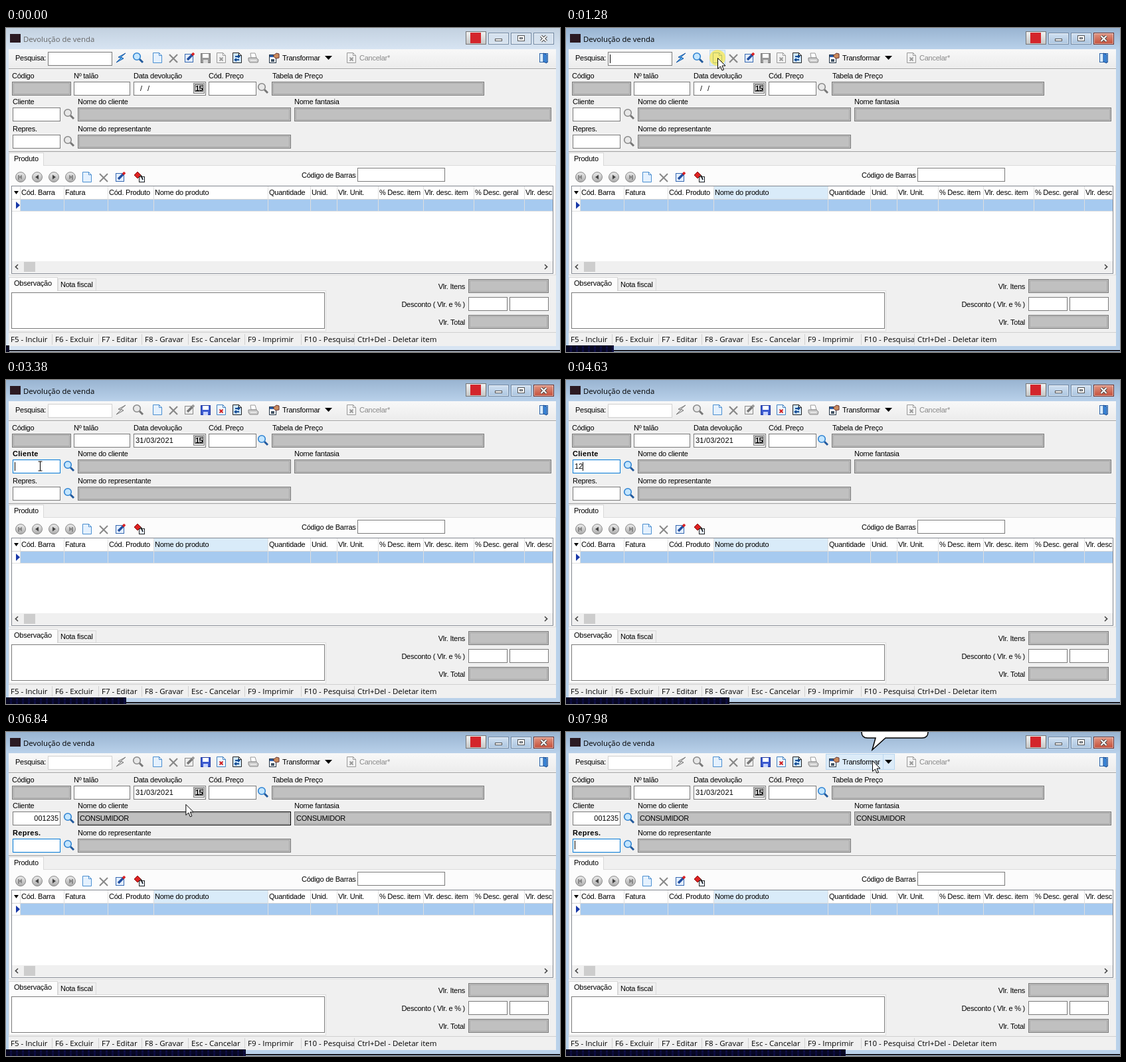
Write an HTML page with a canvas that moves like this. It is 834 px wide and 489 px high and loops after 8 s.

```html
<!DOCTYPE html>
<html lang="pt-BR">
<head>
<meta charset="utf-8">
<title>Devolução de venda</title>
<style>
html, body { margin: 0; width: 100%; height: 100%; overflow: hidden; }
canvas { display: block; }
</style>
</head>
<body>
<canvas id="stage" width="834" height="489"></canvas>
<script>
const ctx = document.getElementById('stage').getContext('2d');
const LOOP = 8000;
const T = { column: 430, activate: 960, record: 1500, client: 2850, hide: 4000, confirm: 5690, agent: 5735, show: 6100, menu: 7360, balloon: 7720 };
const BLUE = '#0078d7', EDGE = '#7a7a7a', PAPER = '#fff', FACE = '#f0f0f0';
const UI = '"Liberation Sans", Arial, sans-serif', SYSTEM = '"Open Sans", sans-serif';

// Pointer waypoints: time, x, y
const PATH = [[70, 632, 486], [430, 365, 250], [790, 228, 45], [1500, 228, 45], [1670, 208, 58], [2240, 51, 130],
  [6100, 51, 130], [6480, 140, 132], [6760, 245, 122], [6840, 270, 109], [7400, 461, 43], [8000, 461, 43]];
const TYPED = [[3980, '1'], [4390, '12'], [4760, '123'], [5010, '1235']];

function fill(x, y, w, h, color) { ctx.fillStyle = color; ctx.fillRect(x, y, w, h); }
function frame(x, y, w, h, color) { ctx.strokeStyle = color; ctx.lineWidth = 1; ctx.strokeRect(x + .5, y + .5, w - 1, h - 1); }
function box(x, y, w, h, bg, edge) { fill(x, y, w, h, bg); frame(x, y, w, h, edge); }
function poly(points, bg, edge, width = 1) {
  ctx.beginPath();
  points.forEach(([x, y]) => ctx.lineTo(x, y));
  ctx.closePath();
  if (bg) { ctx.fillStyle = bg; ctx.fill(); }
  if (edge) { ctx.strokeStyle = edge; ctx.lineWidth = width; ctx.stroke(); }
}
function line(x1, y1, x2, y2, color, width = 1) {
  ctx.strokeStyle = color; ctx.lineWidth = width;
  ctx.beginPath(); ctx.moveTo(x1, y1); ctx.lineTo(x2, y2); ctx.stroke();
}
function disc(x, y, r, bg, edge, width = 1) {
  ctx.beginPath(); ctx.arc(x, y, r, 0, 7);
  if (bg) { ctx.fillStyle = bg; ctx.fill(); }
  if (edge) { ctx.strokeStyle = edge; ctx.lineWidth = width; ctx.stroke(); }
}
function gradient(y1, y2, top, bottom) {
  const g = ctx.createLinearGradient(0, y1, 0, y2);
  g.addColorStop(0, top); g.addColorStop(1, bottom);
  return g;
}
function text(s, x, y, { color = '#000', bold = false, align = 'left', spacing = bold ? .3 : -.25 } = {}) {
  ctx.font = (bold ? 'bold ' : '') + '11px ' + UI;
  ctx.letterSpacing = spacing + 'px';
  ctx.textAlign = align; ctx.fillStyle = color;
  ctx.fillText(s, x, y);
}
function systemText(s, x, y, size, color) {
  ctx.font = size + 'px ' + SYSTEM;
  ctx.letterSpacing = '0px'; ctx.textAlign = 'left'; ctx.fillStyle = color;
  ctx.fillText(s, x, y);
}

function pointerAt(t) {
  if (t < PATH[0][0]) return [-99, -99];
  const i = Math.max(1, PATH.findIndex(p => p[0] >= t));
  const [t0, x0, y0] = PATH[i - 1], [t1, x1, y1] = PATH[i];
  const k = (t - t0) / (t1 - t0);
  return [x0 + (x1 - x0) * k, y0 + (y1 - y0) * k];
}
const pointerVisible = t => t >= PATH[0][0] && (t < T.hide || t >= T.show);
const blink = (t, since) => Math.floor((t - since) / 556) % 2 === 0;
const inside = ([px, py], x, y, w, h) => px >= x && px < x + w && py >= y && py < y + h;

function field(t, x, y, w, { gray = false, focus = false } = {}) {
  const hover = pointerVisible(t - 90) && inside(pointerAt(t - 90), x, y, w, 21);
  box(x, y, w, 21, gray ? '#c0c0c0' : PAPER, focus ? BLUE : hover ? '#000' : EDGE);
  if (gray) frame(x + 2, y + 2, w - 4, 17, '#a9a9a9');
}
function caret(x, y) { fill(x, y, 1, 13, '#000'); }

// Icons are centred on x, y
function page(x, y, edge = '#4a8ed0', bg = '#e4f1ff') {
  poly([[x - 6.5, y - 7.5], [x + 2.5, y - 7.5], [x + 6.5, y - 3.5], [x + 6.5, y + 7.5], [x - 6.5, y + 7.5]], bg, edge);
  poly([[x + 2.5, y - 7.5], [x + 2.5, y - 3.5], [x + 6.5, y - 3.5]], '#fff', edge);
}
function cross(x, y, r, color, width) {
  line(x - r, y - r, x + r, y + r, color, width);
  line(x + r, y - r, x - r, y + r, color, width);
}
function cancelPage(x, y, on) {
  page(x, y, on ? '#3f7fc0' : '#999', on ? '#edf6ff' : '#f2f2f2');
  cross(x, y + 2, 2.5, on ? '#d02020' : '#999', 1.8);
}
function lens(x, y, on) {
  line(x + 2, y + 2, x + 7, y + 7, on ? '#235a9c' : '#777', 3);
  disc(x - 2, y - 2, 5.3, on ? '#c4e6ff' : '#e8e8e8', on ? '#2f83d2' : '#888', 1.6);
}
function bolt(x, y, on) {
  poly([[x + 7, y - 7], [x - 4, y - 1], [x, y], [x - 7, y + 7], [x + 4, y + 1], [x, y - 1]], on ? '#55b4f5' : '#ddd', on ? '#1555a5' : '#777');
}
function pencil(x, y, on) {
  box(x - 7, y - 6, 13, 13, on ? '#e4efff' : '#eee', on ? '#3567b0' : '#888');
  line(x - 3, y + 3, x + 6, y - 6, on ? '#234f9e' : '#777', 3.5);
  line(x + 4, y - 4, x + 7, y - 7, on ? '#d22' : '#999', 3.5);
}
function disk(x, y, on) {
  box(x - 7, y - 7, 15, 15, on ? '#3c5bd0' : '#999', on ? '#2038a0' : '#777');
  fill(x - 4, y - 6, 9, 6, '#fff');
  fill(x - 3, y + 3, 7, 5, on ? '#c8d4ff' : '#ddd');
}
function refresh(x, y) {
  page(x, y, '#222', '#cfe6fb');
  line(x - 3, y - 2, x + 3, y - 2, '#134b94', 2);
  line(x - 3, y + 3, x + 3, y + 3, '#134b94', 2);
  poly([[x + 1, y - 5], [x + 5, y - 2], [x + 1, y + 1]], '#134b94');
  poly([[x - 1, y], [x - 5, y + 3], [x - 1, y + 6]], '#134b94');
}
function printer(x, y) {
  poly([[x - 4, y - 7], [x + 3, y - 7], [x + 5, y], [x - 3, y]], '#fff', '#999');
  poly([[x - 7, y], [x + 5, y], [x + 8, y + 3], [x + 7, y + 7], [x - 5, y + 7], [x - 7, y + 4]], '#ccc', '#888');
  line(x - 4, y + 4, x + 5, y + 4, '#fff');
}
function transformIcon(x, y) {
  box(x - 7, y - 5, 11, 13, '#fff', '#234');
  fill(x - 6, y - 4, 9, 3, '#2c5ea8');
  fill(x - 4, y + 2, 5, 4, '#456');
  poly([[x - 1, y - 3], [x + 4, y - 7], [x + 8, y - 6], [x + 8, y], [x + 3, y + 1]], '#c98a5c', '#633');
}
function door(x, y) {
  box(x - 6, y - 7, 13, 14, '#d9ecff', '#2a62a8');
  poly([[x, y - 7], [x + 5, y - 5], [x + 5, y + 8], [x, y + 6]], '#3b86d8', '#1b4d91');
}
function navButton(x, y, dir, bar) {
  disc(x, y, 7.5, gradient(y - 8, y + 8, '#eee', '#aaa'), '#888');
  const c = bar ? '#888' : '#444';
  poly([[x + 3 * dir, y], [x - 2 * dir, y - 3.5], [x - 2 * dir, y + 3.5]], c);
  if (bar) fill(x + 3 * dir - 1, y - 3, 2, 7, c);
}
function hotButton(x, w) { box(x, 33, w, 24, '#dcebf8', '#b9d7f0'); }

function titleBar(active) {
  fill(0, 0, 834, 489, active ? '#b9d1ea' : '#d7e4f2');
  fill(0, 0, 834, 32, active ? gradient(0, 32, '#99b4d1', '#b9d1ea') : gradient(0, 32, '#c3d1e0', '#d7e4f2'));
  fill(6, 9, 16, 13, '#2b1a22');
  systemText('Devolução de venda', 26, 21, 11.4, active ? '#000' : '#666');
  box(692, 5, 31, 20, gradient(5, 25, '#f4f4f4', '#c4c4c4'), '#777');
  fill(699, 7, 16, 16, '#d3252b');
  [726, 760, 794].forEach((x, i) => {
    const close = i === 2 && active;
    const bg = close ? gradient(7, 25, '#e39a87', '#c14a35') : active ? gradient(7, 25, '#d3e2f2', '#a9c3de') : '#d5e1ee';
    box(x, 7, 31, 18, bg, close ? '#70302a' : '#7389a3');
    frame(x + 1, 8, 29, 16, 'rgba(255,255,255,.5)');
  });
  box(736, 16, 11, 4, '#fff', '#555');
  box(770, 11, 11, 9, '#fff', '#555');
  box(773, 14, 5, 3, '#bcd', '#555');
  cross(809.5, 16, 4, '#444', 4);
  cross(809.5, 16, 4, '#fff', 2.2);
}

function toolbar(t, editing) {
  fill(4, 32, 824, 29, gradient(32, 61, '#f8f8f8', '#ececec'));
  fill(4, 61, 824, 1, '#a0a0a0');
  fill(4, 62, 824, 1, '#fff');
  text('Pesquisa:', 14, 49);
  box(63, 36, 97, 21, PAPER, editing ? '#d0d0d0' : EDGE);
  if (t >= T.activate && !editing && blink(t, T.activate)) caret(66, 40);
  if (t >= 760 && t < 1590) hotButton(216, 24);
  if (t >= T.menu) { hotButton(391, 104); fill(477, 34, 1, 22, '#b9d7f0'); }
  bolt(173, 45, !editing);
  lens(199, 45, !editing);
  page(228, 45);
  cross(252, 46, 6, '#888', 2.2);
  pencil(276, 45, !editing);
  disk(300, 45, editing);
  cancelPage(324, 45, editing);
  refresh(348, 45);
  printer(372, 45);
  transformIcon(403, 45);
  text('Transformar', 416, 49);
  poly([[480, 42], [491, 42], [485.5, 48]], '#000');
  cancelPage(520, 45, false);
  text('Cancelar*', 532, 49, { color: '#8a8a8a' });
  door(809, 45);
}

function form(t, editing) {
  const onNumber = editing && t < T.client;
  const onClient = t >= T.client && t < T.agent;
  const onAgent = t >= T.agent;
  const filled = t >= T.confirm;
  [['Código', 9, 76], ['Nº talão', 102, 76, onNumber], ['Data devolução', 192, 76], ['Cód. Preço', 305, 76], ['Tabela de Preço', 401, 76],
   ['Cliente', 10, 115, onClient], ['Nome do cliente', 108, 115], ['Nome fantasia', 434, 115],
   ['Repres.', 10, 156, onAgent], ['Nome do representante', 108, 156]]
    .forEach(([s, x, y, bold]) => text(s, x, y, { bold }));
  field(t, 9, 81, 89, { gray: true });
  field(t, 102, 81, 85, { focus: onNumber });
  field(t, 192, 81, 109);
  field(t, 305, 81, 72);
  field(t, 400, 81, 320, { gray: true });
  field(t, 10, 120, 72, { focus: t >= T.client && t < T.agent + 80 });
  field(t, 108, 120, 321, { gray: true });
  field(t, 434, 120, 387, { gray: true });
  field(t, 10, 161, 72, { focus: t >= T.agent + 80 });
  field(t, 108, 161, 321, { gray: true });
  [[387, 91], [95, 130], [95, 171]].forEach(([x, y]) => lens(x, y, editing));
  box(282, 83, 17, 16, '#e4e4e4', '#777');
  frame(284, 85, 13, 11, '#444');
  text('15', 290.5, 95, { bold: true, align: 'center', spacing: -.5 });
  if (editing) text('31/03/2021', 195, 95, { spacing: .2 });
  else { text('/', 202, 95); text('/', 213, 95); }

  if (onNumber && blink(t, 1780)) caret(106, 84);
  if (filled) {
    text('001235', 79, 134, { align: 'right', spacing: 0 });
    text('CONSUMIDOR', 111, 134);
    text('CONSUMIDOR', 437, 134);
  } else if (onClient) {
    const key = TYPED.filter(([at]) => t >= at).pop() || [T.client, ''];
    text(key[1], 13, 134, { spacing: 0 });
    if (blink(t, key[0])) caret(13 + Math.round(key[1].length * 6.1), 124);
  }
  if (onAgent && blink(t, T.agent)) caret(13, 164);
}

function products(t) {
  fill(4, 186, 824, 1, '#a0a0a0');
  box(4, 207, 824, 166, '#fcfcfc', '#dcdcdc');
  box(4, 188, 53, 20, '#fcfcfc', '#d9d9d9');
  fill(5, 206, 51, 3, '#fcfcfc');
  text('Produto', 12, 201);
  navButton(22, 225, -1, true);
  navButton(47, 225, -1);
  navButton(72, 225, 1);
  navButton(97, 225, 1, true);
  page(122, 225);
  cross(147, 226, 6, '#888', 2);
  pencil(172, 225, true);
  poly([[193, 222], [198, 217], [203, 222], [198, 227]], '#d22', '#811');
  box(200, 224, 9, 9, '#e8f2ff', '#222');
  line(203, 222, 206, 229, '#000', 1.5);
  text('Código de Barras', 445, 226);
  box(529, 211, 132, 21, PAPER, EDGE);

  box(8, 238, 816, 133, PAPER, '#828790');
  if (t >= T.column) fill(223, 239, 171, 19, '#d9ebf9');
  fill(9, 258, 814, 1, '#d5d5d5');
  fill(22, 259, 801, 17, '#a6caf0');
  fill(9, 276, 814, 1, '#e0e0e0');
  ctx.save();
  ctx.beginPath(); ctx.rect(9, 239, 813, 38); ctx.clip();
  [['Cód. Barra', 21], ['Fatura', 87], ['Cód. Produto', 153], ['Nome do produto', 222], ['Quantidade', 394], ['Unid.', 458],
   ['Vlr. Unit.', 498], ['% Desc. item', 560], ['Vlr. desc. item', 628], ['% Desc. geral', 704], ['Vlr. desc. geral', 780]]
    .forEach(([s, x]) => { fill(x, 239, 1, 37, '#dedede'); text(s, x + 2, 252); });
  ctx.restore();
  poly([[12, 246], [19, 246], [15.5, 251]], '#000');
  poly([[15, 262], [21, 267.5], [15, 273]], '#1838a8');
  fill(9, 352, 814, 17, FACE);
  fill(27, 353, 17, 15, '#cdcdcd');
  [[16, -1], [813, 1]].forEach(([x, d]) => {
    line(x - 2 * d, 357, x + 2 * d, 361, '#444', 1.6);
    line(x + 2 * d, 360, x - 2 * d, 364, '#444', 1.6);
  });
}

function footer(t) {
  box(4, 396, 478, 62, '#fcfcfc', '#dcdcdc');
  box(78, 378, 58, 19, FACE, '#d9d9d9');
  box(4, 376, 74, 21, '#fcfcfc', '#d9d9d9');
  fill(5, 395, 72, 3, '#fcfcfc');
  text('Observação', 12, 389);
  text('Nota fiscal', 82, 391);
  box(8, 399, 472, 55, PAPER, EDGE);
  [['Vlr. Itens', 394], ['Desconto ( Vlr. e % )', 421], ['Vlr. Total', 448]].forEach(([s, y]) => text(s, 691, y, { align: 'right' }));
  field(t, 696, 379, 121, { gray: true });
  field(t, 696, 406, 59);
  field(t, 758, 406, 59);
  field(t, 696, 433, 121, { gray: true });

  fill(4, 459, 824, 1, '#d0d0d0');
  [['F5 - Incluir', 7], ['F6 - Excluir', 74], ['F7 - Editar', 144], ['F8 - Gravar', 209], ['Esc - Cancelar', 279],
   ['F9 - Imprimir', 364], ['F10 - Pesquisa', 449], ['Ctrl+Del - Deletar item', 529]].forEach(([s, x], i) => {
    if (i) fill(x - 5, 462, 1, 16, '#d0d0d0');
    systemText(s, x, 474, 11.5, '#000');
  });
  fill(0, 486, 834, 2, '#15151c');
}

function progress(t) {
  const w = Math.round(5 + t * .0521);
  fill(0, 479, w, 10, '#05051f');
  for (let x = 6; x < w; x += 9) fill(x, 480, Math.min(3, w - x), 9, '#0d0d42');
  fill(0, 484, w, 1, '#090930');
}

function balloon(t) {
  if (t < T.balloon) return;
  ctx.globalAlpha = Math.min(1, (t - T.balloon) / 200);
  ctx.beginPath();
  ctx.moveTo(445, -20); ctx.lineTo(445, 0);
  ctx.quadraticCurveTo(445, 9, 454, 9);
  ctx.lineTo(466, 9); ctx.lineTo(461, 27); ctx.lineTo(481, 9); ctx.lineTo(536, 9);
  ctx.quadraticCurveTo(545, 9, 545, 0);
  ctx.lineTo(545, -20);
  ctx.fillStyle = '#fff'; ctx.fill();
  ctx.strokeStyle = '#000'; ctx.lineWidth = 1.5; ctx.stroke();
  ctx.globalAlpha = 1;
}

function pointer(t) {
  if (!pointerVisible(t)) return;
  const [x, y] = pointerAt(t);
  if ((t >= 1190 && t < 1450) || (t >= 2800 && t < 3050)) disc(x, y, 12, 'rgba(255,232,40,.6)');
  const editable = [[102, 81, 85], [192, 81, 90], [305, 81, 72], [10, 120, 72]];
  if (editable.some(([fx, fy, fw]) => inside([x, y], fx, fy, fw, 21))) {
    const cx = Math.round(x) + .5;
    line(cx, y - 7, cx, y + 7, '#000');
    line(cx - 3, y - 7, cx + 3, y - 7, '#000');
    line(cx - 3, y + 7, cx + 3, y + 7, '#000');
  } else {
    const shape = [[0, 0], [0, 16], [4, 12.5], [6.5, 18.5], [9, 17.5], [6.5, 11.5], [11.5, 11.5]];
    poly(shape.map(([dx, dy]) => [x + dx + .5, y + dy + .5]), '#fff', '#000');
  }
}

function draw(t) {
  const editing = t >= T.record;
  titleBar(t >= T.activate);
  fill(4, 32, 824, 448, FACE);
  toolbar(t, editing);
  form(t, editing);
  products(t);
  footer(t);
  progress(t);
  balloon(t);
  pointer(t);
}

const start = performance.now();
function tick() {
  draw((performance.now() - start) % LOOP);
  requestAnimationFrame(tick);
}
tick();
</script>
</body>
</html>
```
